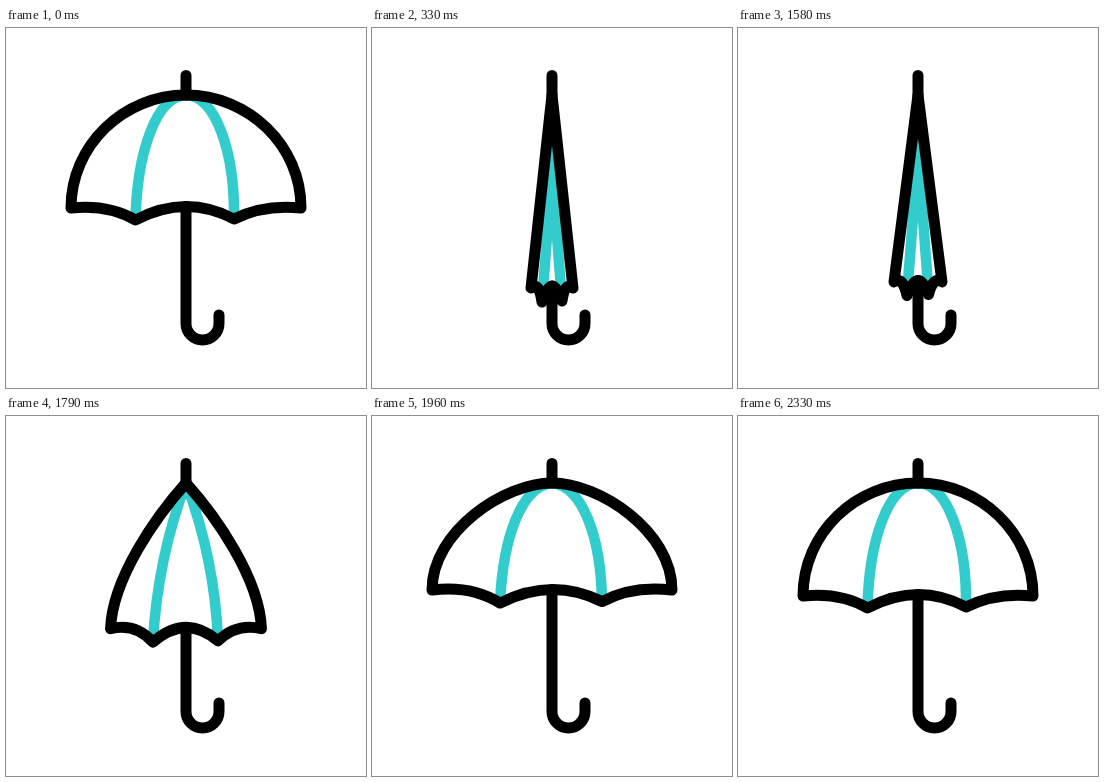
These frames come from a looping animation (360x360 px, 3 s). An HTML page:

```html
<!DOCTYPE html>
<html lang="en">
<head>
<meta charset="utf-8">
<title>Umbrella</title>
<style>
  html, body { margin: 0; width: 100%; height: 100%; overflow: hidden; background: #fff; }
  svg { display: block; width: 100%; height: 100%; }
</style>
</head>
<body>
<svg viewBox="0 0 360 360" fill="none" stroke="#000" stroke-width="11" stroke-linecap="round" stroke-linejoin="round">
  <path id="ribs" stroke="#33cccc" stroke-width="10.5" stroke-linecap="butt"/>
  <path id="shaft"/>
  <path id="canopy"/>
</svg>
<script>
const LOOP = 3000, FPS = 24, MID = 180, APEX = 67;

// Left-hand points; the right side mirrors them, except for its valley.
const open = {
  corner: [65, 180], side1: [65, 117], side2: [118, 67],
  valley: [129.5, 192], valleyR: [228, 191], scallop: [102, 176],
  hub: [MID, 178.5], rib1: [131, 125], rib2: [150, 68]
};
const wide = {
  corner: [60, 174], side1: [60, 115], side2: [133, 67],
  valley: [128, 187], valleyR: [230, 185.5], scallop: [99, 169],
  hub: [MID, 173.5], rib1: [131, 120], rib2: [150, 70]
};
const tight = {
  corner: [159, 260], side1: [163, 220], side2: [172, 140],
  valley: [170, 274], valleyR: [190, 273], scallop: [167, 253],
  hub: [MID, 258], rib1: [174, 220], rib2: [180, 160]
};
const closed = {
  corner: [153, 248], side1: [160, 200], side2: [171, 128],
  valley: [168, 261], valleyR: [191, 260], scallop: [162, 242],
  hub: [MID, 247], rib1: [172.5, 195], rib2: [180, 130]
};

// Times in animation steps of 1/24 s.
const keys = [
  [0, open], [2, wide], [8, tight], [12, closed],
  [37, closed], [39, tight], [46.5, wide], [56, open], [72, open]
];

const ease = t => t * t * (3 - 2 * t);
const mirror = ([x, y]) => [2 * MID - x, y];
const [ribs, shaft, canopy] = ["ribs", "shaft", "canopy"].map(id => document.getElementById(id));

function poseAt(step) {
  const i = keys.findIndex(([time]) => time > step);
  const [t0, a] = keys[i - 1], [t1, b] = keys[i];
  const k = ease((step - t0) / (t1 - t0));
  const pose = {};
  for (const name in a) pose[name] = a[name].map((v, j) => v + (b[name][j] - v) * k);
  return pose;
}

function draw(ms) {
  const step = Math.floor((ms + 5) * FPS / 1000) % (LOOP * FPS / 1000);
  const p = poseAt(step);
  const apex = [MID, APEX];
  const arch = [MID, 2 * p.hub[1] - (p.valley[1] + p.valleyR[1]) / 2];

  canopy.setAttribute("d",
    `M${p.corner}C${p.side1} ${p.side2} ${apex}` +
    `C${mirror(p.side2)} ${mirror(p.side1)} ${mirror(p.corner)}` +
    `Q${mirror(p.scallop)} ${p.valleyR}Q${arch} ${p.valley}Q${p.scallop} ${p.corner}Z`);
  ribs.setAttribute("d",
    `M${p.valley}C${p.rib1} ${p.rib2} ${apex}` +
    `C${mirror(p.rib2)} ${mirror(p.rib1)} ${p.valleyR}`);
  shaft.setAttribute("d",
    `M${MID} 47.5V${APEX}M${p.hub}V295.5a16.5 16.5 0 0 0 33 0V287`);
}

const start = performance.now();
function tick() {
  draw((performance.now() - start) % LOOP);
  requestAnimationFrame(tick);
}
tick();
</script>
</body>
</html>
```
